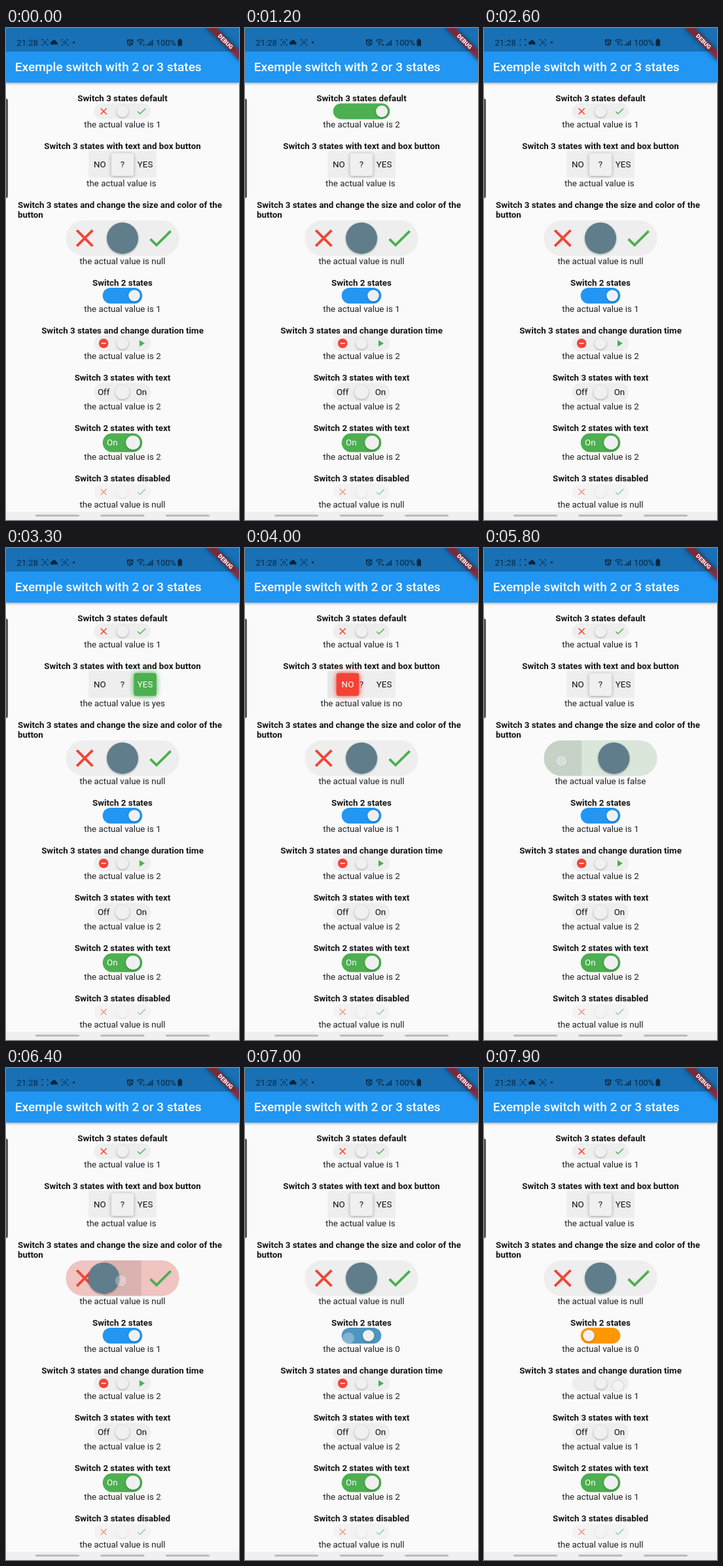
These frames come from a looping animation (356x752 px, 8 s). An HTML page with a canvas:

```html
<!DOCTYPE html>
<html lang="en">
<head>
<meta charset="utf-8">
<title>Exemple switch with 2 or 3 states</title>
<style>
html, body { margin: 0; width: 100%; height: 100%; overflow: hidden; background: #fafafa; }
canvas { display: block; width: 356px; height: 752px; }
</style>
</head>
<body>
<canvas id="stage"></canvas>
<script>
const LOOP = 8000, MID = 178;
const RED = [244, 67, 54], GREEN = [76, 175, 80], GREY = [238, 238, 238];
const BLUE = [33, 150, 243], ORANGE = [255, 152, 0];
const canvas = document.getElementById('stage');
const ctx = canvas.getContext('2d');
const dpr = window.devicePixelRatio || 1;
canvas.width = 356 * dpr;
canvas.height = 752 * dpr;

// Taps: [time, new position], where -1 is left, 0 the middle and 1 right.
const taps = {
  basic: [[240, -1], [880, 1], [1680, -1], [2340, 0]],
  box: [[3050, 1], [3800, -1], [4360, 0]],
  large: [[5220, 1], [5720, -1], [6275, 0]],
  two: [[6950, -1]],
  slow: [[7850, 1]]
};

const clamp = v => Math.max(0, Math.min(1, v));
const rgb = c => `rgb(${c.map(Math.round)})`;
const mix = (a, b, k) => a.map((v, i) => v + (b[i] - v) * k);

function switchState(list, t, start = 0, duration = 250) {
  const s = { pos: start, state: start, ink: 0, touched: false, cell: start };
  for (const [time, to] of list) {
    const age = t - time;
    if (age >= -60) {
      s.cell = to;
      s.ink = 0.085 * clamp((240 - age) / 100);
      s.touched = age < 150;
    }
    if (age >= 0) {
      s.pos = s.state + (to - s.state) * clamp(age / duration);
      s.state = to;
    }
  }
  return s;
}

function rect(x, y, w, h, r, fill) {
  ctx.beginPath();
  ctx.roundRect(x, y, w, h, r);
  ctx.fillStyle = fill;
  ctx.fill();
}

function circle(x, y, r, fill) {
  ctx.beginPath();
  ctx.arc(x, y, r, 0, 7);
  ctx.fillStyle = fill;
  ctx.fill();
}

function shaded(color, blur, dy, draw) {
  ctx.save();
  ctx.shadowColor = color;
  ctx.shadowBlur = blur * dpr;
  ctx.shadowOffsetY = dy * dpr;
  draw();
  ctx.restore();
}

function text(str, x, y, { size = 13.34, weight = 400, color = '#212121', align = 'center' } = {}) {
  ctx.font = `${weight} ${size}px Roboto, sans-serif`;
  ctx.textAlign = align;
  ctx.fillStyle = color;
  ctx.fillText(str, x, y);
}

const heading = (str, y, x = MID, align = 'center') => text(str, x, y, { weight: 700, color: '#151515', align });
const value = (v, y) => text('the actual value is ' + v, MID, y);
const label = (str, x, y, color = '#111') => text(str, x, y, { color });

// Icons live in a 24-unit square centred on x, y.
function icon(name, x, y, size) {
  ctx.save();
  ctx.translate(x, y);
  ctx.scale(size / 24, size / 24);
  ctx.translate(-12, -12);
  ctx.lineWidth = 2;
  ctx.strokeStyle = ctx.fillStyle = rgb(name === 'cross' || name === 'minus' ? RED : GREEN);
  ctx.beginPath();
  if (name === 'cross') {
    ctx.moveTo(5.7, 5.7); ctx.lineTo(18.3, 18.3);
    ctx.moveTo(18.3, 5.7); ctx.lineTo(5.7, 18.3);
    ctx.stroke();
  } else if (name === 'check') {
    ctx.moveTo(4.12, 12.7); ctx.lineTo(9, 17.58); ctx.lineTo(20.3, 6.3);
    ctx.stroke();
  } else if (name === 'play') {
    ctx.moveTo(8, 5); ctx.lineTo(8, 19); ctx.lineTo(19, 12);
    ctx.fill();
  } else {
    ctx.arc(12, 12, 10, 0, 7);
    ctx.fill();
    ctx.fillStyle = '#fff';
    ctx.fillRect(7, 11, 10, 2);
  }
  ctx.restore();
}

const knob = (x, y, r, fill = '#f0f0f0', shade = 0.32) =>
  shaded(`rgba(0,0,0,${shade})`, 3, 1, () => circle(x, y, r, fill));

function ink(s, x, y, w, h, r) {
  if (!s.ink) return;
  ctx.save();
  ctx.beginPath();
  ctx.roundRect(x, y, w, h, r);
  ctx.clip();
  ctx.fillStyle = `rgba(0,0,0,${s.ink})`;
  ctx.fillRect(x + (s.cell + 1) * w / 3, y, w / 3, h);
  ctx.restore();
}

function touch(s, reach, y) {
  if (!s.touched) return;
  circle(MID + s.cell * reach - 2, y + 4, 9, 'rgba(255,255,255,.3)');
  ctx.strokeStyle = 'rgba(130,135,165,.3)';
  ctx.lineWidth = 1;
  ctx.stroke();
}

function iconSwitch(s, { y, w = 86.6, h = 24.2, r = 9, reach = 31, size = 17.4, icons = ['cross', 'check'], fill, alpha = 1 }) {
  const x = MID - w / 2, top = y - h / 2, cell = w / 3;
  ctx.globalAlpha = alpha;
  rect(x, top, w, h, h / 2, rgb(mix(GREY, s.pos < 0 ? RED : GREEN, s.pos ** 2)));
  ink(s, x, top, w, h, h / 2);
  if (!s.state) icons.forEach((name, i) => icon(name, MID + (i * 2 - 1) * cell, y, size));
  ctx.globalAlpha = 1;
  knob(MID + s.pos * reach, y, r, fill, 0.32 * alpha ** 2);
  touch(s, cell, y);
}

function boxSwitch(s) {
  const names = ['NO', '?', 'YES'], x = MID + s.pos * 34.6;
  rect(126, 187.8, 104, 41.5, 0, rgb(GREY));
  ink(s, 126, 187.8, 104, 41.5, 0);
  names.forEach((name, i) => { if (i - 1 !== s.state) label(name, MID + (i - 1) * 34.6, 213.3); });
  const color = s.state ? rgb(s.state < 0 ? RED : GREEN) : '#f0f0f0';
  shaded(s.state ? color : 'rgba(0,0,0,.32)', s.state ? 8 : 5, s.state ? 0 : 1,
    () => rect(x - 17.3, 191.3, 34.6, 34.6, 3.5, color));
  label(names[s.state + 1], x, 213.3, s.state ? '#fff' : '#111');
  touch(s, 34.6, 209);
}

function scanIcon(x, y, dot) {
  ctx.strokeStyle = ctx.fillStyle = 'rgba(5,28,48,.82)';
  ctx.lineWidth = 1;
  ctx.beginPath();
  for (const a of [-1, 1]) for (const b of [-1, 1]) {
    ctx.moveTo(x + a * 4.5, y + b * 2.5);
    ctx.lineTo(x + a * 4.5, y + b * 4.5);
    ctx.lineTo(x + a * 2.5, y + b * 4.5);
  }
  ctx.stroke();
  if (dot) {
    ctx.beginPath();
    ctx.arc(x, y, 2, 0, 7);
    ctx.stroke();
  }
}

function statusBar(t) {
  const dark = 'rgba(5,28,48,.88)';
  shaded('rgba(0,0,0,.3)', 4, 1.5, () => rect(0, 0, 356, 83.5, 0, rgb(BLUE)));
  rect(0, 0, 356, 36, 0, '#1970b5');
  text('21:28', 16.5, 27, { size: 13, color: dark, align: 'left' });
  scanIcon(59.5, 22, (t + 100) % 1000 < 500);
  circle(70.5, 23, 2.6, dark);
  circle(73.5, 21.5, 3.2, dark);
  circle(76.5, 23.4, 2.2, dark);
  scanIcon(90, 22, true);
  circle(103.5, 22, 1.6, dark);

  ctx.strokeStyle = dark;
  ctx.lineWidth = 1.6;
  ctx.beginPath();
  ctx.arc(189.5, 22.3, 4, 0, 7);
  ctx.moveTo(189.5, 20); ctx.lineTo(189.5, 23); ctx.lineTo(191.5, 24);
  ctx.moveTo(184.5, 19.5); ctx.lineTo(187, 17.5);
  ctx.moveTo(194.5, 19.5); ctx.lineTo(192, 17.5);
  ctx.stroke();
  ctx.lineWidth = 1.1;
  ctx.beginPath();
  for (const r of [3, 5.5, 8]) {
    ctx.moveTo(205.5 + r * Math.cos(-2.3), 25.5 + r * Math.sin(-2.3));
    ctx.arc(205.5, 25.5, r, -2.3, -0.85);
  }
  ctx.stroke();
  circle(205.5, 25.5, 1.1, dark);
  circle(210.5, 25.5, 1.3, dark);
  for (let i = 0; i < 4; i++) rect(215 + i * 2.6, 25 - i * 2.2, 1.5, 2 + i * 2.2, 0, dark);
  text('100%', 229, 27, { size: 12.8, color: dark, align: 'left' });
  rect(262.5, 18, 6.5, 9.5, 1, dark);
  rect(264, 16.5, 3.5, 2, 0, dark);
  text('Exemple switch with 2 or 3 states', 13.86, 66.2, { size: 19.05, weight: 500, color: '#fff', align: 'left' });
}

function debugBanner() {
  ctx.save();
  ctx.translate(356, 0);
  ctx.rotate(Math.PI / 4);
  shaded('rgba(0,0,0,.8)', 7, 0, () => rect(-38, 24.25, 76, 10.4, 0, 'rgba(183,28,28,.63)'));
  text('DEBUG', 0, 32.3, { size: 8.83, weight: 900, color: '#fff' });
  ctx.restore();
}

function draw(t) {
  ctx.setTransform(dpr, 0, 0, dpr, 0, 0);
  rect(0, 0, 356, 752, 0, '#fafafa');
  statusBar(t);
  debugBanner();

  const basic = switchState(taps.basic, t);
  heading('Switch 3 states default', 112);
  iconSwitch(basic, { y: 127.3 });
  value(basic.state + 1, 151.7);

  const box = switchState(taps.box, t);
  heading('Switch 3 states with text and box button', 184.7);
  boxSwitch(box);
  value(['no', '', 'yes'][box.state + 1], 242);

  const large = switchState(taps.large, t);
  heading('Switch 3 states and change the size and color of the', 274.7, 18, 'left');
  heading('button', 290.4, 18, 'left');
  iconSwitch(large, { y: 321.2, w: 173.2, h: 54.5, r: 24, reach: 57.7, size: 46, fill: '#607d8b' });
  value(['false', 'null', 'true'][large.state + 1], 360.6);

  const two = switchState(taps.two, t, 1);
  heading('Switch 2 states', 393.5);
  rect(147.7, 397, 60.6, 24.2, 12.1, rgb(mix(ORANGE, BLUE, (two.pos + 1) / 2)));
  knob(MID + two.pos * 18, 409, 8.8);
  touch(two, 18, 409);
  value(two.state > 0 ? 1 : 0, 433.5);

  const slow = switchState(taps.slow, t, 0, 2000);
  const shared = slow.state ? 1 : 2;
  heading('Switch 3 states and change duration time', 466.5);
  iconSwitch({ ...slow, ink: 0 }, { y: 482, icons: ['minus', 'play'] });
  value(shared, 506);

  heading('Switch 3 states with text', 539);
  rect(134.7, 542.6, 86.6, 28.6, 14.3, rgb(GREY));
  label('Off', MID - 28.9, 561.3);
  label('On', MID + 28.9, 561.3);
  knob(MID, 556.5, 10.8);
  value(shared, 583.3);

  heading('Switch 2 states with text', 616);
  rect(147.7, 619.6, 60.6, 28.6, 14.3, rgb(GREEN));
  label('On', 162.3, 638.3, '#fff');
  knob(194, 633.7, 10.8);
  value(shared, 660.4);

  heading('Switch 3 states disabled', 693);
  iconSwitch(switchState([], t), { y: 709, fill: '#f4f4f4', alpha: 0.55 });
  value('null', 733);

  rect(-3, 108, 6, 152, 3, '#555');
  rect(0, 739.5, 356, 12.5, 0, '#f0f0f0');
  for (const x of [45, 144.5, 244]) rect(x, 743.8, 67, 3, 1.5, '#b9b9b9');
}

function frame(now) {
  draw(now % LOOP);
  requestAnimationFrame(frame);
}
frame(performance.now());
</script>
</body>
</html>
```
